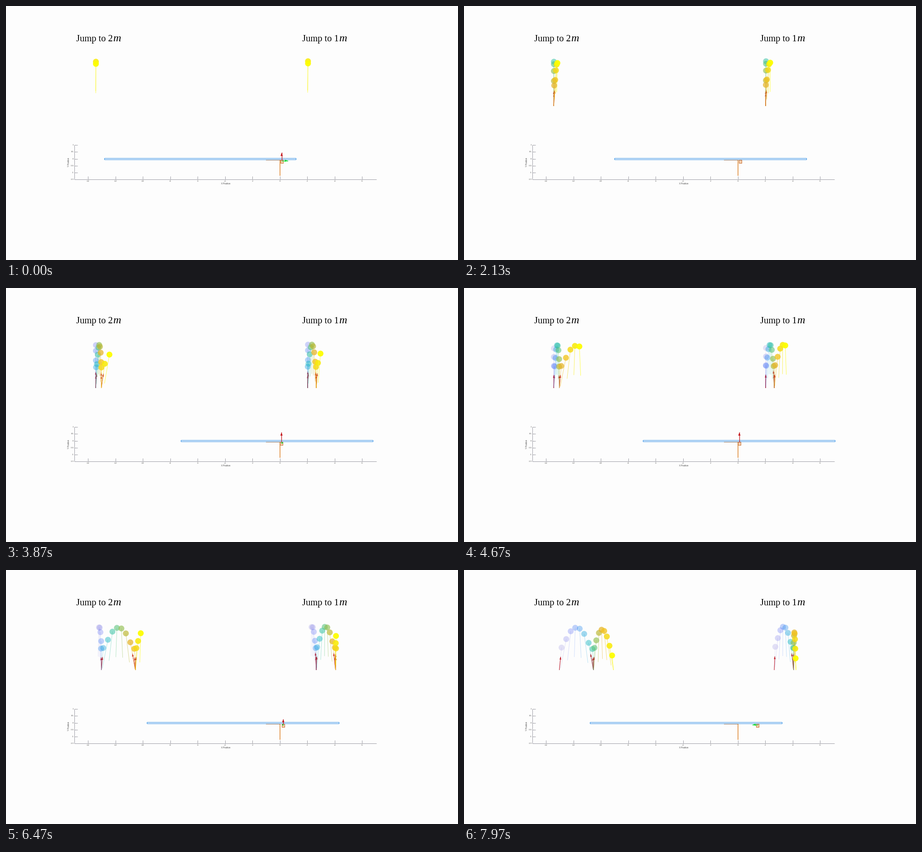
Write a matplotlib script that moves like this. It is 998 by 561 pixels and loops after 8000 ms.

```python
import numpy as np
import matplotlib.pyplot as plt
from matplotlib.animation import FuncAnimation
from matplotlib.collections import LineCollection, PolyCollection
from matplotlib.colors import LinearSegmentedColormap
from matplotlib.patches import Rectangle

W, H, DPI = 998, 561, 100
LOOP, INTERVAL = 8000, 40
PX = 72 / DPI                  # points per pixel
STEP, TRAIL = 300, 16          # ms between ghost poses, number of ghosts
GROUND, LEG, GRAVITY = 221, 64.5, 4.8
PERIOD, SQUASH, SINK = 7.92, 18.3, 21.4
RED, GREEN, GREY = "#c4161c", "#1fe03a", "#9c9ca4"

fig = plt.figure(figsize=(W / DPI, H / DPI), dpi=DPI, facecolor="#fdfdfd")
ax = fig.add_axes([0, 0, 1, 1])
ax.set_xlim(0, W)
ax.set_ylim(H, 0)
ax.axis("off")

cmap = LinearSegmentedColormap.from_list("trail", [
    "#5a4cd0", "#4a58f4", "#3388f4", "#16b4d0", "#3cc690",
    "#a4bc3c", "#f0b428", "#f5dc16", "#fdfd00"])
ages = np.arange(TRAIL)[::-1]
ball_colors = cmap(1 - ages / (TRAIL - 1))
ball_colors[:, 3] = 0.94 - 0.052 * ages
leg_colors = ball_colors * [1, 1, 1, 0.8]


def head(start, tip, length, half):
    """Triangle for an arrow that ends at tip."""
    start, tip = np.array(start, float), np.array(tip, float)
    u = (tip - start) / np.hypot(*(tip - start))
    side = np.array([-u[1], u[0]]) * half
    base = tip - u * length
    return [tip, base + side, base - side]


class Hopper:
    """Spring-legged ball: parabolic flights joined by sinusoidal stances."""

    def __init__(self, contact, feet, apex_x, apex_y):
        self.contact, self.feet, self.top = contact, feet, apex_y
        self.x = apex_x
        self.speed = np.diff(feet, prepend=feet[0]) / 7.6
        self.apex = PERIOD * np.arange(len(feet))
        self.half = np.sqrt((contact - np.array(apex_y)) / GRAVITY)
        self.legs = LineCollection([], linewidths=0.9 * PX, zorder=3)
        self.shafts = LineCollection([], colors=RED, linewidths=1.1 * PX, zorder=2)
        self.heads = PolyCollection([], facecolors=RED, edgecolors="none", zorder=2)
        self.balls = ax.scatter([], [], s=(13 * PX) ** 2, linewidths=0, zorder=4)
        for c in (self.legs, self.shafts, self.heads):
            ax.add_collection(c)

    def flight_x(self, i, s):
        return self.x[i] + self.speed[i] * (s - self.apex[i])

    def pose(self, s):
        """Ball, foot and whether the leg is pushing, at step s."""
        land, lift = self.apex + self.half, self.apex - self.half
        i = int(np.sum(s >= lift)) - 1
        x, y = self.flight_x(i, s), self.top[i] + GRAVITY * (s - self.apex[i]) ** 2
        foot = np.interp(s, [lift[i], land[i]], [self.feet[max(i - 1, 0)], self.feet[i]])
        final = i == len(self.feet) - 1
        pushing = s > land[i] and not final
        if pushing:
            span = lift[i + 1] - land[i]
            u = (s - land[i]) / span
            y = self.contact + SQUASH * np.sin(np.pi * u)
            blend = u * u * (3 - 2 * u)
            x = (1 - blend) * x + blend * self.flight_x(i + 1, s)
        elif s > land[i]:
            y = self.contact + SINK * (s - land[i])
        foot_y = min(GROUND, y + np.sqrt(LEG ** 2 - (foot - x) ** 2))
        return np.array([x, y]), np.array([foot, foot_y]), pushing

    def draw(self, now):
        times = now - ages
        keep = times >= 0
        poses = [self.pose(s) for s in times[keep]]
        self.balls.set_offsets([p[0] for p in poses])
        self.balls.set_facecolors(ball_colors[keep])
        self.legs.set_segments([p[:2] for p in poses])
        self.legs.set_color(leg_colors[keep])
        pushes = [(foot, foot + 0.59 * (ball - foot))
                  for ball, foot, pushing in poses if pushing]
        self.shafts.set_segments(pushes)
        self.heads.set_verts([head(a, b, 6, 1.9) for a, b in pushes])


class Arrow:
    def __init__(self, color):
        self.line, = ax.plot([], [], color=color, lw=1.3 * PX, zorder=7)
        self.tip = PolyCollection([], facecolors=color, edgecolors="none", zorder=7)
        ax.add_collection(self.tip)

    def draw(self, x, y, dx, dy):
        size = np.hypot(dx, dy)
        shown = size > 0.8
        self.line.set_data(*([x, x + dx], [y, y + dy]) if shown else ([], []))
        self.tip.set_verts(
            [head((x, y), (x + dx, y + dy), min(7, size), 2.5)] if shown else [])


def label(x, y, text, size, **kw):
    opts = dict(family="Liberation Sans", color="#444444", ha="center", va="center")
    ax.text(x, y, text, fontsize=size * PX, **{**opts, **kw})


def line(x, y, color=GREY, width=1, z=1):
    ax.plot(x, y, color=color, lw=width * PX, zorder=z, solid_capstyle="butt")


# headings
serif = dict(family="Liberation Serif", color="black", ha="left", va="baseline")
for x, digit in ((155, "2"), (654, "1")):
    label(x, 78, "Jump to " + digit, 20.5, **serif)
    label(x + 81, 78, "m", 24, style="italic", **serif)

# lower plot, in metres
X0, Y0, UNIT = 604.7, 337.5, 30.25
line([151.5, 151.5], [307, 383])
line([151, 818.5], [382.7, 382.7])
for v in range(-14, 7, 2):
    x = X0 + v * UNIT
    line([x, x], [376, 383])
    label(x, 387, str(v), 4.2)
for v in np.arange(-1.5, 1.1, 0.5):
    y = Y0 - v * UNIT
    line([151, 158], [y, y])
    label(149.5, y, f"{v:g}", 4.2, ha="right")
label(485, 392, "X Position", 4.5)
label(138.5, 345, "Y Position", 4.5, rotation=90)

line([574.5, 605.7], [339.9, 339.9], "#d98238", 1.5, 4)
line([604.9, 604.9], [339.2, 375], "#e08a35", 1.6, 4)
beam = Rectangle((0, 335.8), 14 * UNIT, 3.2, fc="#f8fbfe", ec="#3b94e6",
                 lw=1.1 * PX, zorder=5)
box = Rectangle((0, 340.2), 6.3, 6.3, fc="#f6cfae", ec="#c9783f",
                lw=1.1 * PX, zorder=6)
ax.add_patch(beam)
ax.add_patch(box)
lift_arrow, push_arrow = Arrow(RED), Arrow(GREEN)

# the beam is driven, rests, is driven again, rests, and is drawn back
KEYS = [0, 1.6, 2.9, 3, 4, 5.7, 7.22, 8]                  # seconds
BEAM_END = [1.13, 5, 5, 5, 7.07, 7.07, 1.53, 3.25]        # metres
BOX_AT = [0.13, 0.19, 0.17, 0.16, 0.11, 0.11, 0.38, 1.46]
PUSH = [14, 0, 0, 20.5, 0, 0, -5, -11]                    # arrow pixels
LIFT = [16, 0, 0, 21, 21, 21, 0, 0]

left = Hopper(157.3, [198.2, 210.5, 285.7, 330],
              [198.5, 206, 248.5, 305], [123, 125.8, 127.2, 131.7])
right = Hopper(156, [666, 685, 727.6, 733],
               [666.8, 675.8, 705.8, 729.5], [122, 125, 125, 137.7])


def update(i):
    t = (i + 0.5) * INTERVAL
    now = max(1, 0.94 + t / STEP)
    left.draw(now)
    right.draw(now)
    end, at, push, lift = (np.interp(t / 1000, KEYS, track)
                           for track in (BEAM_END, BOX_AT, PUSH, LIFT))
    x = X0 + at * UNIT
    beam.set_x(X0 + (end - 14) * UNIT)
    box.set_x(x - 3.15)
    lift_arrow.draw(x, 340, 0, -lift)
    push_arrow.draw(x, 341.8, push, 0)
    return []


anim = FuncAnimation(fig, update, frames=LOOP // INTERVAL, interval=INTERVAL,
                     init_func=lambda: update(0), repeat=True, repeat_delay=0,
                     blit=False)
plt.show()
```
